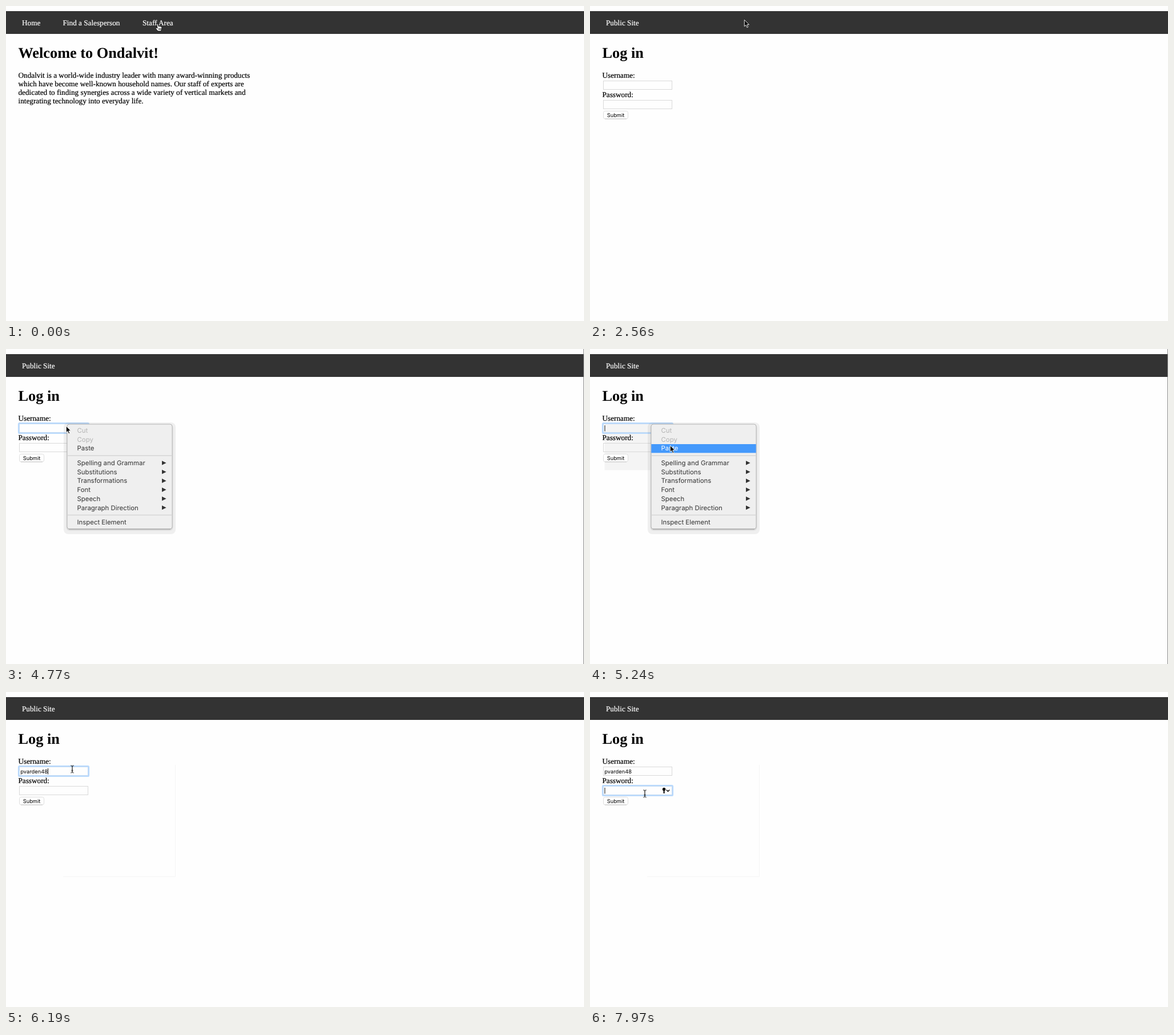
An HTML page for the animation above (8 s loop, 1012x553 px).

```html
<!DOCTYPE html>
<html lang="en">
<head>
<meta charset="utf-8">
<title>Log in</title>
<style>
  html, body { margin: 0; width: 100%; height: 100%; overflow: hidden; background: #fefefe; }
  svg { display: block; width: 1012px; height: 553px; }
  text { white-space: pre; text-rendering: geometricPrecision; }
  .page { font: 13.23px "Liberation Serif", serif; stroke: #000; stroke-width: .2; }
  .page .title { font-size: 26.3px; font-weight: bold; stroke: none; }
  .page .nav { fill: #fff; stroke: #fff; }
  .ui { font: 9.3px Inter, sans-serif; }
  .field { fill: none; stroke: #d9d9d9; }
  .ring { fill: none; stroke: #bbdafc; stroke-width: 2.8; }
  .caret { stroke: #111; stroke-width: 1; }
  .menu { font: 11.4px Inter, sans-serif; fill: #333; }
  .off { fill: #b4b4b4; }
  .rule { stroke: #d5d5d5; stroke-width: 1.6; }
  .ghost { fill: none; stroke: #f4f4f4; }

  /* Percentages are time / 80 ms; every change is a hard cut. */
  .t { animation: 8s step-end infinite; visibility: hidden; }
  #home { animation-name: home; }
  #login { animation-name: login; }
  #userRing { animation-name: userRing; }
  #userCaret { animation-name: userCaret; }
  #passFocus { animation-name: passFocus; }
  #user, #ghost { animation-name: pasted; }
  #textCaret { animation-name: textCaret; }
  #menu { animation-name: menu; }
  #paste, #patch { animation-name: chosen; }
  #edge { animation-name: edge; }
  #hand { animation-name: hand; }
  #arrow { animation-name: arrow; }
  #beam { animation-name: beam; }
  #pointer { animation: pointer 8s step-end infinite; }

  @keyframes home { 0% { visibility: visible } 32%, to { visibility: hidden } }
  @keyframes login { 0% { visibility: hidden } 32%, to { visibility: visible } }
  @keyframes userRing { 0%, 97.875%, to { visibility: hidden } 44.875% { visibility: visible } }
  @keyframes userCaret { 0%, 54.125%, 75.5%, to { visibility: hidden } 44.875%, 65.5% { visibility: visible } }
  @keyframes passFocus { 0% { visibility: hidden } 97.875%, to { visibility: visible } }
  @keyframes pasted { 0% { visibility: hidden } 75.5%, to { visibility: visible } }
  @keyframes textCaret { 0%, 97.875%, to { visibility: hidden } 75.5% { visibility: visible } }
  @keyframes menu { 0%, 75.5%, to { visibility: hidden } 54.125% { visibility: visible } }
  @keyframes chosen { 0%, 75.5%, to { visibility: hidden } 65.5% { visibility: visible } }
  @keyframes edge { 0%, 67.375%, to { visibility: hidden } 54.125% { visibility: visible } }
  @keyframes hand {
    0%, 15%, 24.5% { visibility: visible }
    13.125%, 16.875%, 28.25%, to { visibility: hidden }
  }
  @keyframes arrow {
    0%, 15%, 24.5%, 39.375%, 77.375%, to { visibility: hidden }
    13.125%, 16.875%, 28.25%, 54.125% { visibility: visible }
  }
  @keyframes beam {
    0%, 54.125% { visibility: hidden }
    39.375%, 77.375%, to { visibility: visible }
  }
  @keyframes pointer {
    0% { transform: translate(265px, 31px) }
    11.25% { transform: translate(242px, 29px) }
    13.125% { transform: translate(190px, 13px) }
    15% { transform: translate(124px, 25px) }
    16.875% { transform: translate(109px, 48px) }
    18.75% { transform: translate(152px, 65px) }
    20.625% { transform: translate(228px, 57px) }
    22.625% { transform: translate(267px, 38px) }
    24.5% { transform: translate(270px, 26px) }
    28.25% { transform: translate(270px, 24px) }
    33.875% { transform: translate(264px, 32px) }
    35.75% { transform: translate(230px, 70px) }
    37.5% { transform: translate(172px, 112px) }
    39.375% { transform: translate(122px, 134px) }
    41.125% { transform: translate(106px, 137px) }
    54.125% { transform: translate(105px, 135px) }
    61.875% { transform: translate(112px, 145px) }
    63.75% { transform: translate(128px, 159px) }
    65.5% { transform: translate(140px, 169px) }
    67.375% { transform: translate(147px, 174px) }
    71.875% { transform: translate(150px, 175px) }
    75.5% { transform: translate(142px, 165px) }
    77.375% { transform: translate(116px, 135.5px) }
    79.25% { transform: translate(109px, 136px) }
    81.125% { transform: translate(107px, 136px) }
    82.875% { transform: translate(106px, 136px) }
    86.625% { transform: translate(105px, 136px) }
    88.5% { transform: translate(106px, 137px) }
    90.375% { transform: translate(105px, 136px) }
    94.125% { transform: translate(104px, 146px) }
    96% { transform: translate(100px, 164px) }
    97.875% { transform: translate(97px, 176px) }
    99.625%, to { transform: translate(96px, 178.5px) }
  }
</style>
</head>
<body>
<svg viewBox="0 0 1012 553">
  <rect y="9" width="1012" height="40" fill="#333"/>

  <g id="home" class="page t">
    <g class="nav">
      <text x="28" y="34">Home</text>
      <text x="99.5" y="34">Find a Salesperson</text>
      <text x="239" y="34">Staff Area</text>
    </g>
    <text class="title" x="21.5" y="90.5">Welcome to Ondalvit!</text>
    <text x="21.5" y="126">Ondalvit is a world-wide industry leader with many award-winning products</text>
    <text x="21.5" y="141">which have become well-known household names. Our staff of experts are</text>
    <text x="21.5" y="156">dedicated to finding synergies across a wide variety of vertical markets and</text>
    <text x="21.5" y="171">integrating technology into everyday life.</text>
  </g>

  <rect id="patch" class="t" x="25.5" y="132" width="81.5" height="80.5" fill="#f4f4f4"/>
  <path id="ghost" class="ghost t" d="M296.5 128V324H100"/>

  <g id="login" class="t">
    <g class="page">
      <text class="nav" x="28" y="34">Public Site</text>
      <text class="title" x="21.5" y="90.5">Log in</text>
      <text x="21.5" y="126">Username:</text>
      <text x="21.5" y="160">Password:</text>
    </g>
    <rect class="field" x="23.5" y="131.5" width="120" height="15"/>
    <rect class="field" x="23.5" y="165.5" width="120" height="15"/>
    <rect x="23.5" y="184.5" width="43" height="13.5" rx="3" fill="#fff" stroke="#dedede"/>
    <path d="M26 198.2H64" stroke="#c8c8c8"/>
    <text class="ui" x="45" y="195" text-anchor="middle">Submit</text>
  </g>

  <rect id="userRing" class="ring t" x="22.3" y="130.3" width="122.4" height="17.4" rx="1.5"/>
  <path id="userCaret" class="caret t" d="M26 134V144.5"/>
  <text id="user" class="ui t" x="25.3" y="143">pvarden48</text>
  <path id="textCaret" class="caret t" d="M73.5 134V144.5"/>

  <g id="passFocus" class="t">
    <rect class="ring" x="22.3" y="164.3" width="122.4" height="17.4" rx="1.5"/>
    <path class="caret" d="M26 168V178.5"/>
    <circle cx="129.6" cy="170.8" r="2.7"/>
    <path d="M129.6 172V178" stroke="#000" stroke-width="2"/>
    <path d="M133.8 171.7L136.5 174.4 139.2 171.7" fill="none" stroke="#000" stroke-width="1.4"/>
  </g>

  <g id="menu" class="menu t">
    <rect x="101" y="129" width="196" height="196" rx="8" fill="#000" fill-opacity=".06"/>
    <rect x="105.5" y="132" width="187" height="187" rx="6" fill="#000" fill-opacity=".08"/>
    <rect x="107" y="132" width="184" height="184" rx="4" fill="#efefef" stroke="#b4b4b4"/>
    <path d="M110 316.2H288" stroke="#9c9c9c"/>
    <text class="off" x="124.5" y="147">Cut</text>
    <text class="off" x="124.5" y="162.7">Copy</text>
    <text x="124.5" y="178.3">Paste</text>
    <path class="rule" d="M107.5 187.3H290.5M107.5 291.5H290.5"/>
    <text x="124.5" y="204">Spelling and Grammar</text>
    <text x="124.5" y="219.7">Substitutions</text>
    <text x="124.5" y="235.4">Transformations</text>
    <text x="124.5" y="251.1">Font</text>
    <text x="124.5" y="266.8">Speech</text>
    <text x="124.5" y="282.5">Paragraph Direction</text>
    <text x="124.5" y="308">Inspect Element</text>
    <defs><path id="more" d="M273 196.2L280.6 200 273 203.8Z"/></defs>
    <use href="#more"/>
    <use href="#more" y="15.7"/>
    <use href="#more" y="31.4"/>
    <use href="#more" y="47.1"/>
    <use href="#more" y="62.8"/>
    <use href="#more" y="78.5"/>
  </g>
  <g id="paste" class="menu t">
    <rect x="107.3" y="167" width="183.4" height="15.4" fill="#4499fc"/>
    <text x="124.5" y="178.3" style="fill:#fff">Paste</text>
  </g>

  <rect id="edge" class="t" x="1011" width="1" height="553" fill="#8c8c8c"/>

  <g id="pointer">
    <path id="hand" class="t" fill="#fff" stroke="#000" stroke-width=".8" stroke-linejoin="round"
      d="M-1.3 .8Q-.2-.6 .9 .8L2 4.6Q3.4 3.6 4.2 4.8 5.4 4.1 6.1 5.3 7.6 4.9 7.9 6.4L7.4 10 6.3 13H.9L-2.8 8.4Q-3.1 6.6-1 7.3L.2 8.2ZM2.6 8V11M4.3 8V11M6 8V11"/>
    <path id="arrow" class="t" fill="#000" stroke="#fff" stroke-width=".9"
      d="M.3 .3V11.8L2.9 9.4 4.9 13.7 6.8 12.9 4.9 8.7H8.5Z"/>
    <path id="beam" class="t" fill="none" stroke="#000" stroke-width="1.1"
      d="M-2.8-6.3Q-.3-6.3 0-5 .3-6.3 2.8-6.3M0-5V5M-2.8 6.3Q-.3 6.3 0 5 .3 6.3 2.8 6.3M-1.5 2.2H1.5"/>
  </g>
</svg>
</body>
</html>
```
